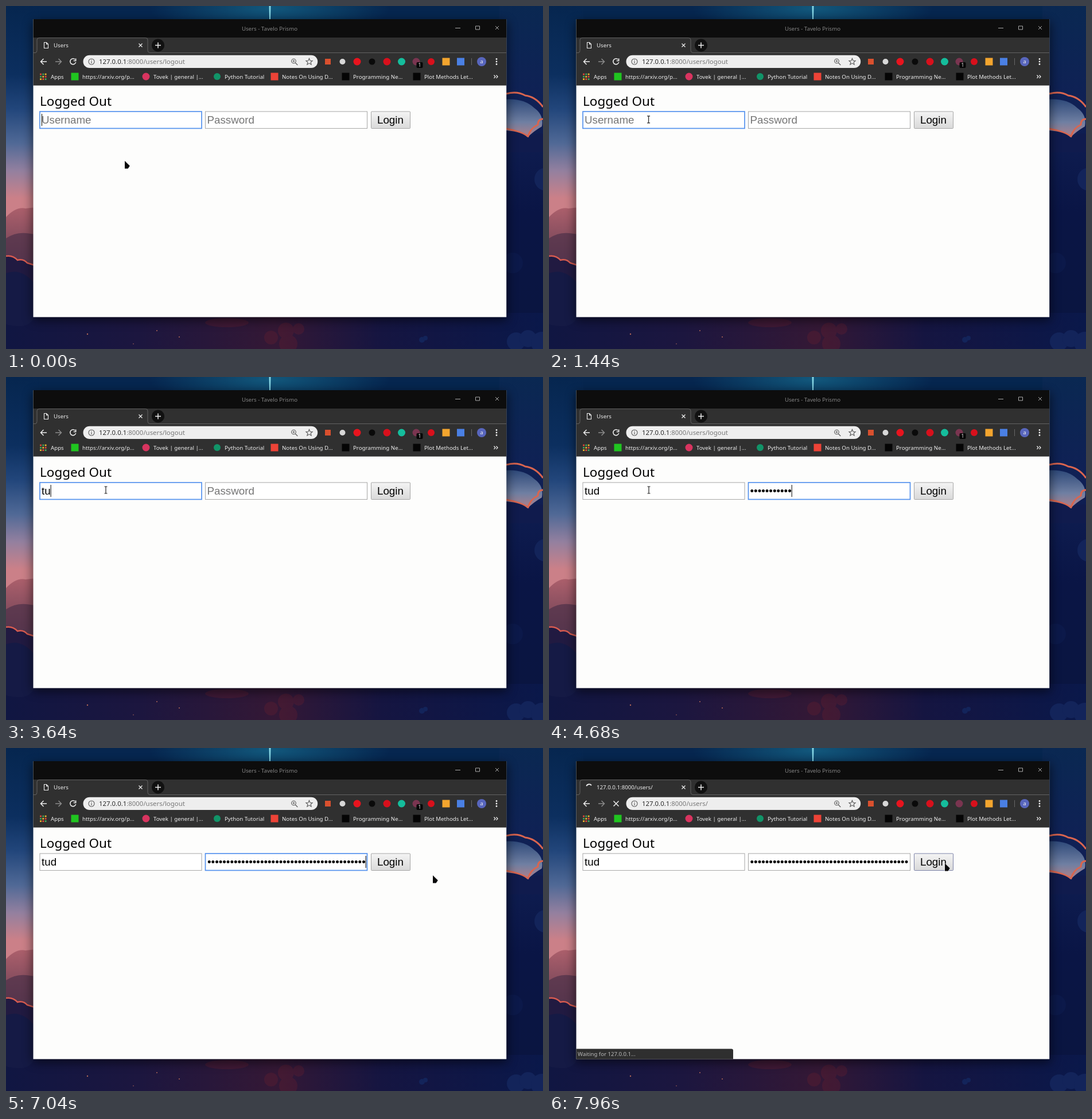
An HTML page for the animation above (8 s loop, 936 px wide and 598 px high).

```html
<!DOCTYPE html>
<html lang="en">
<head>
<meta charset="utf-8">
<title>Login demo</title>
<style>
  html, body { margin: 0; width: 100%; height: 100%; overflow: hidden; background: #0a1440; }
  svg { display: block; }
  text { font: 9.7px "Noto Sans", sans-serif; fill: #eee; white-space: pre; }
  .field { font: 18.75px "Liberation Sans", Arial, sans-serif; fill: #000; }
  .line { fill: none; stroke: #eee; stroke-width: 1.5; }
  .box { fill: #fff; stroke: #a6a6a6; }
  .focus { stroke: #5592ee; stroke-width: 1.7; }
  .hint { fill: #757575; }
</style>
</head>
<body>
<svg width="936" height="598" viewBox="0 0 936 598">
  <defs>
    <linearGradient id="sky" x2="0" y2="1">
      <stop stop-color="#06264f"/><stop offset=".2" stop-color="#0c2f5f"/>
      <stop offset=".3" stop-color="#22467b"/><stop offset=".4" stop-color="#506996"/>
      <stop offset=".48" stop-color="#93809f"/><stop offset=".56" stop-color="#cb8088"/>
    </linearGradient>
    <linearGradient id="hill" x2="0" y2="1">
      <stop stop-color="#ad606c"/><stop offset="1" stop-color="#59384f"/>
    </linearGradient>
    <linearGradient id="night" x2="0" y2="1">
      <stop stop-color="#0a2852"/><stop offset=".3" stop-color="#102055"/>
      <stop offset=".6" stop-color="#0a1545"/><stop offset="1" stop-color="#0a153f"/>
    </linearGradient>
    <linearGradient id="ground">
      <stop stop-color="#101642"/><stop offset=".25" stop-color="#1c163f"/>
      <stop offset=".5" stop-color="#341835"/><stop offset=".7" stop-color="#151541"/>
      <stop offset="1" stop-color="#0a184a"/>
    </linearGradient>
    <linearGradient id="pocket" x2="0" y2="1">
      <stop stop-color="#2f4a7a"/><stop offset=".6" stop-color="#6f7fa2"/><stop offset="1" stop-color="#b0808a"/>
    </linearGradient>
    <linearGradient id="button" x2="0" y2="1">
      <stop stop-color="#f4f4f4"/><stop offset="1" stop-color="#d9d9d9"/>
    </linearGradient>
    <radialGradient id="glow">
      <stop stop-color="#12587c"/><stop offset="1" stop-color="#12587c" stop-opacity="0"/>
    </radialGradient>
    <filter id="blur" x="-20%" y="-20%" width="140%" height="140%"><feGaussianBlur stdDeviation="9"/></filter>
    <clipPath id="inside"><rect x="348" y="185" width="281" height="28"/></clipPath>
  </defs>

  <!-- wallpaper -->
  <rect width="936" height="598" fill="#06264f"/>
  <rect width="60" height="598" fill="url(#sky)"/>
  <rect x="860" width="76" height="598" fill="url(#night)"/>
  <ellipse cx="460" cy="4" rx="210" ry="50" fill="url(#glow)"/>
  <path d="M458.5 0h3l-.5 23h-2z" fill="#86d5e4"/>
  <path d="M0 368Q18 349 34 353L60 350V470H0Z" fill="url(#hill)"/>
  <path d="M0 405Q25 388 60 402V460H0Z" fill="#4d3149" opacity=".7"/>
  <path d="M0 435Q12 434 20 443Q30 439 37 448L60 453V545H0Z" fill="#211a41"/>
  <path d="M0 436Q12 434 20 443Q30 440 37 448L50 452" fill="none" stroke="#d95c50" stroke-width="2.5"/>
  <rect y="535" width="936" height="63" fill="url(#ground)"/>
  <path d="M0 466Q26 456 48 482V545Q38 565 0 555Z" fill="#151a45"/>
  <g fill="#6b202f" opacity=".3">
    <circle cx="488" cy="566" r="14"/><circle cx="510" cy="563" r="10"/>
    <circle cx="462" cy="578" r="12"/><circle cx="492" cy="589" r="16"/>
    <ellipse cx="385" cy="552" rx="38" ry="8"/>
  </g>
  <g fill="#b56a59"><circle cx="142" cy="572" r="1.2"/><circle cx="263" cy="566" r="1"/><circle cx="302" cy="577" r="1"/><circle cx="222" cy="589" r=".8"/></g>
  <path d="M860 164Q900 158 921 178Q938 190 934 210Q920 218 909 229Q895 219 860 216Z" fill="url(#pocket)"/>
  <path d="M872 153Q891 148 905 156Q923 158 936 176" fill="none" stroke="#d9654f" stroke-width="3"/>
  <path d="M936 197Q927 197 927 207Q914 213 910 227Q895 218 872 214" fill="none" stroke="#d9654f" stroke-width="3"/>
  <path d="M872 217Q900 219 910 230Q923 220 936 223V255H872Z" fill="#101b4d"/>
  <g fill="#13245a">
    <circle cx="941" cy="302" r="20"/><circle cx="883" cy="448" r="18" opacity=".3"/>
    <circle cx="889" cy="585" r="16"/><circle cx="910" cy="580" r="15"/><circle cx="934" cy="587" r="19"/>
    <circle cx="725" cy="582" r="5"/><circle cx="731" cy="579" r="4"/>
  </g>

  <!-- browser window -->
  <rect x="46" y="28" width="828" height="520" fill="#000" opacity=".55" filter="url(#blur)"/>
  <rect x="47.5" y="23" width="824.7" height="519.4" fill="#fdfdfc"/>
  <rect x="47.5" y="23" width="824.7" height="32" fill="#0d0d0d"/>
  <rect x="47.5" y="55" width="824.7" height="83.6" fill="#303030"/>
  <text x="459.5" y="43" text-anchor="middle" style="fill:#858585">Users - Tavelo Prismo</text>
  <path class="line" d="M783 38.5h9M818.5 35h7v6h-7zM853 35l6 6m0-6l-6 6" style="stroke:#aaa;stroke-width:1"/>
  <path class="line" d="M48 81.5h3q3 0 3-4V59q0-3.5 4-3.5H243q4 0 4 3.5V77.5q0 4 4 4H872" style="stroke:#626262;stroke-width:1"/>
  <path id="page-icon" class="line" d="M66.5 63.5h4l3 3v7h-7zM70.5 63.5v3h3" style="stroke-width:1.1"/>
  <path id="spinner" class="line" d="M65.3 66.3A5 5 0 0 1 74 65.3" style="stroke-width:1.8"/>
  <text id="tab" x="83" y="72"></text>
  <path class="line" d="M231.5 65.5l6 6m0-6l-6 6" style="stroke-width:1.2"/>
  <circle cx="265" cy="68.5" r="11" fill="#111"/>
  <path class="line" d="M260 68.5h10m-5-5v10"/>
  <path class="line" d="M71 97H60.5m5-5l-5 5 5 5"/>
  <path class="line" d="M86 97h10.5m-5-5l5 5-5 5" style="stroke:#8b8b8b"/>
  <path id="reload" class="line" d="M120.5 93.3A5 5 0 1 0 121.7 98M121.7 91.5v4h-4"/>
  <path id="stop" class="line" d="M112.5 92.5l9 9m0-9l-9 9"/>
  <rect x="134.5" y="85.7" width="408.7" height="22.4" rx="11.2" fill="#eee"/>
  <g class="line" style="stroke:#555;stroke-width:1.1">
    <circle cx="149" cy="97" r="5"/><path d="M149 96v4m0-6.2v1.2"/>
    <circle cx="501.5" cy="96" r="3.8"/><path d="M504.3 99l4 4M499.7 96h3.6m-1.8-1.8v3.6"/>
    <path d="M528.5 91.5l1.6 3.7 4 .3-3 2.6 1 4-3.6-2.2-3.6 2.2 1-4-3-2.6 4-.3z"/>
  </g>
  <text x="162" y="101" style="font-size:11.4px;fill:#2b2b2b">127.0.0.1<tspan id="path" fill="#777"></tspan></text>
  <g id="icons"></g>
  <g id="badge"><rect x="715.5" y="98" width="11" height="10" rx="2" fill="#050505"/><text x="721" y="106.3" text-anchor="middle" style="font-size:8.5px">1</text></g>
  <path d="M811.5 91v12" stroke="#666"/>
  <circle cx="829" cy="97" r="8" fill="#5866bd"/>
  <text x="829" y="100" text-anchor="middle">a</text>
  <g fill="#eee"><circle cx="855" cy="92.5" r="1.4"/><circle cx="855" cy="97" r="1.4"/><circle cx="855" cy="101.5" r="1.4"/></g>
  <path class="line" d="M850.5 120.5l2.5 2.7-2.5 2.7m4-5.4l2.5 2.7-2.5 2.7" style="stroke-width:1.3"/>

  <!-- page -->
  <text x="59" y="174" style="font-size:22.5px;fill:#000">Logged Out</text>
  <rect id="user-box" x="59" y="184" width="282" height="29.4"/>
  <rect id="pass-box" x="347.5" y="184" width="282" height="29.4"/>
  <text id="user" x="62" y="205"></text>
  <g clip-path="url(#inside)"><text id="pass" x="350.5" y="205"></text></g>
  <rect id="caret" y="188" width="1" height="21" fill="#000"/>
  <rect id="login" x="636.5" y="184" width="68" height="29.5" rx="1" fill="url(#button)" stroke="#a6a6a6"/>
  <text class="field" x="647" y="205">Login</text>
  <g id="status"><path d="M47.5 524.6H318q3 0 3 3v14.8H47.500z" fill="#2f2f2f"/><text x="50" y="537" style="font-size:9.6px;fill:#bbb">Waiting for 127.0.0.1...</text></g>

  <path id="arrow" d="M0 0V13.500H5.500L8.800 8.800Z" fill="#080808" stroke="#fff" stroke-width="1" stroke-linejoin="round" paint-order="stroke"/>
  <path id="beam" d="M-2.5-6H2.5M0-6V6M-2.5 6H2.5" fill="none" stroke="#222" stroke-width="1.2"/>
</svg>
<script>
const LOOP = 8000;
const USER = "tud";
const DOTS = 42;
const USER_KEYS = [3360, 3560, 3760];
const CLICK = 1500, TAB = 4200, PASS_START = 4350, PASS_END = 5650, PRESS = 7680, LOAD = 7800;
const BLINK_OFFSET = 300;
const MOUSE = [
  [0, 207, 270], [250, 207, 270], [800, 173.5, 198], [1400, 173.5, 198], [1550, 174, 197],
  [6100, 174, 197], [6900, 744, 222], [7150, 744, 222], [7600, 690, 201], [LOOP, 690, 201]
];

const $ = id => document.getElementById(id);
const show = (id, on) => $(id).setAttribute("visibility", on ? "visible" : "hidden");
const disc = (x, y, r, color) => `<circle cx="${x}" cy="${y}" r="${r}" fill="${color}"/>`;
const square = (x, y, size, color) =>
  `<rect x="${x - size / 2}" y="${y - size / 2}" width="${size}" height="${size}" fill="${color}"/>`;

function buildIcons() {
  const extensions = [
    [561, "#d9502e", square, 10], [586.5, "#d8d8d8", disc, 5], [612, "#e8141e", disc, 6.5],
    [638, "#0a0a0a", disc, 5.5], [664, "#d8101c", disc, 6.5], [689.5, "#15bd9c", disc, 6.5],
    [715, "#7a3550", disc, 6.5], [741, "#d8101c", disc, 6], [767, "#f3a52e", square, 13],
    [792.5, "#4a80e4", square, 13]
  ];
  const bookmarks = [
    [120, "#20c520", square, 13, "https://arxiv.org/p..."],
    [244, "#d8345f", disc, 6.5, "Tovek | general |..."],
    [368, "#119468", disc, 6, "Python Tutorial"],
    [468, "#ed4337", square, 13, "Notes On Using D..."],
    [592, "#050505", square, 13, "Programming Ne..."],
    [716, "#050505", square, 13, "Plot Methods Let..."]
  ];
  let out = extensions.map(([x, color, shape, size]) => shape(x, 97, size, color)).join("");
  for (let i = 0; i < 9; i++) {
    const color = ["#e2493a", "#42a85a", "#e9b52d"][(i + Math.floor(i / 3)) % 3];
    out += square(60.5 + i % 3 * 4.3, 119 + Math.floor(i / 3) * 4.3, 2.8, color);
  }
  out += '<text x="78" y="127">Apps</text>';
  for (const [x, color, shape, size, label] of bookmarks)
    out += shape(x, 123, size, color) + `<text x="${x + 13}" y="127">${label}</text>`;
  $("icons").innerHTML = out;
}

function mouseAt(t) {
  const i = MOUSE.findIndex(([end]) => end > t);
  const [t0, x0, y0] = MOUSE[i - 1], [t1, x1, y1] = MOUSE[i];
  const p = (t - t0) / (t1 - t0), e = p * p * (3 - 2 * p);
  return [x0 + (x1 - x0) * e, y0 + (y1 - y0) * e];
}

function setField(id, value, hint, focused) {
  $(id).textContent = value || hint;
  $(id).setAttribute("class", value ? "field" : "field hint");
  $(id + "-box").setAttribute("class", focused ? "box focus" : "box");
}

function draw(t) {
  const loading = t >= LOAD, pressed = t >= PRESS;
  const onUser = t < TAB, onPass = !onUser && !pressed;
  const typed = USER_KEYS.filter(k => k <= t).length;
  const dots = Math.round(DOTS * Math.min(1, Math.max(0, (t - PASS_START) / (PASS_END - PASS_START))));

  setField("user", USER.slice(0, typed), "Username", onUser);
  setField("pass", "•".repeat(dots), "Password", onPass);
  $("pass").setAttribute("x", onPass && dots === DOTS ? 351 : 350.5);

  // The blink restarts with every click or key.
  const field = onUser ? "user" : "pass", filled = onUser ? typed : dots;
  const inputs = [-BLINK_OFFSET, CLICK, ...USER_KEYS, TAB, PASS_END].filter(k => k <= t);
  const typing = t >= PASS_START && t < PASS_END;
  const blinkOn = typing || (t - inputs[inputs.length - 1]) % 1000 < 500;
  const start = Number($(field).getAttribute("x"));
  $("caret").setAttribute("x", start + (filled ? $(field).getComputedTextLength() : 0));
  show("caret", !pressed && blinkOn);

  $("tab").textContent = loading ? "127.0.0.1:8000/users/" : "Users";
  $("path").textContent = loading ? ":8000/users/" : ":8000/users/logout";
  show("page-icon", !loading);
  show("reload", !loading);
  show("badge", !loading);
  show("spinner", loading);
  show("stop", loading);
  show("status", loading);
  $("spinner").setAttribute("transform", `rotate(${(7960 - t) * 0.36} 70 68.5)`);
  $("login").setAttribute("stroke", pressed ? "#7d83a8" : "#a6a6a6");
  $("login").setAttribute("fill", pressed && !loading ? "#dcdcdc" : "url(#button)");

  const [x, y] = mouseAt(t);
  const overField = y > 184 && y < 214 && x > 58 && x < 630;
  show("beam", overField);
  show("arrow", !overField);
  for (const id of ["beam", "arrow"]) $(id).setAttribute("transform", `translate(${x} ${y})`);
}

function tick() {
  draw(performance.now() % LOOP);
  requestAnimationFrame(tick);
}

buildIcons();
tick();
</script>
</body>
</html>
```
